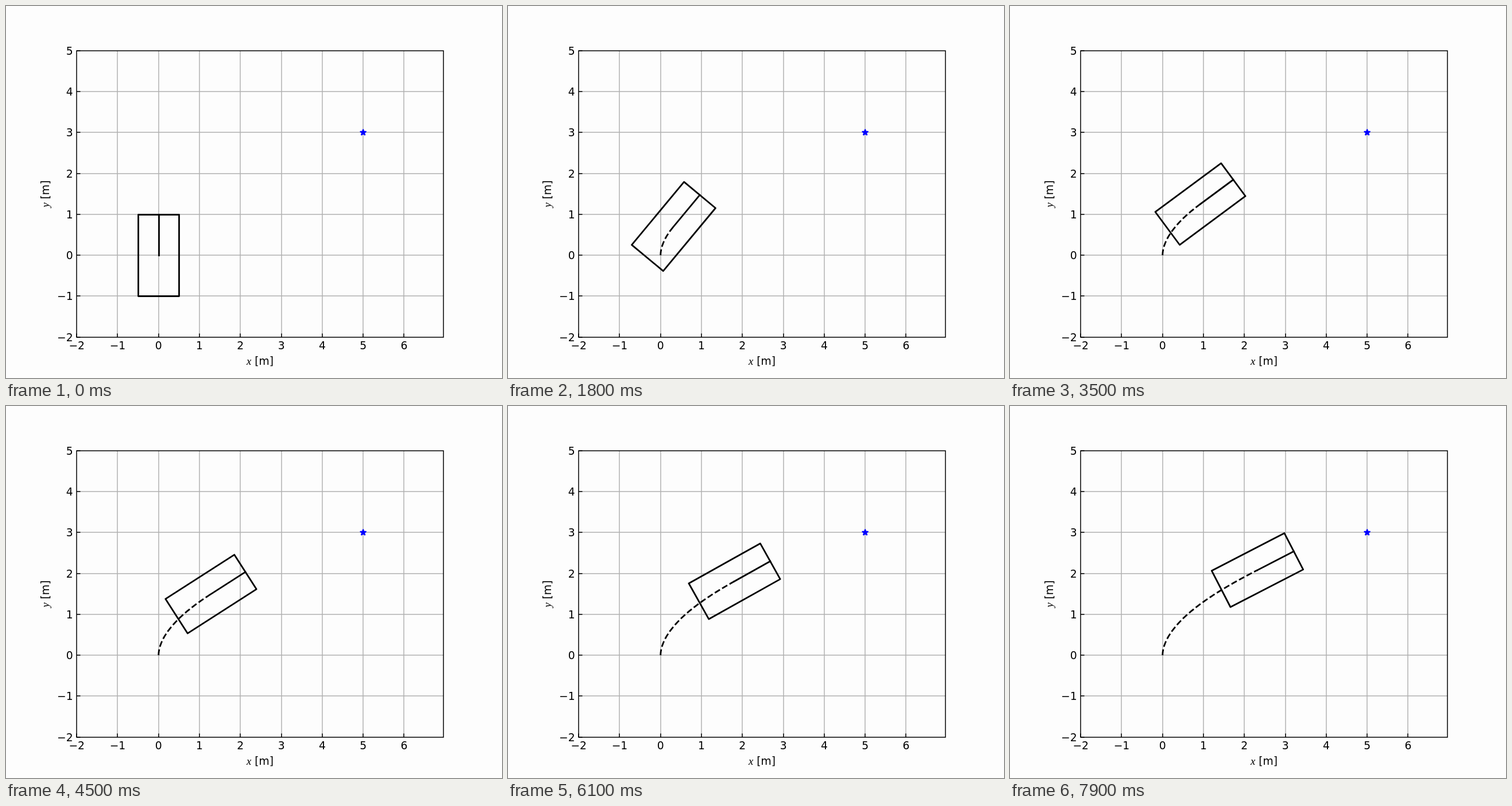
These frames come from a looping animation (864x648 px, 8 s). An HTML page:

```html
<!DOCTYPE html>
<html lang="en">
<head>
<meta charset="utf-8">
<title>Vehicle driving to a goal</title>
<style>
  html, body { margin: 0; width: 100%; height: 100%; overflow: hidden; background: #fdfdfd; }
  svg { display: block; width: 864px; height: 648px; }
  text { font: 18.75px "DejaVu Sans", sans-serif; fill: #000; }
  .var { font: italic 18.75px "Liberation Serif", serif; }
  .grid { stroke: #b0b0b0; stroke-width: 1.5; }
  .axis { stroke: #000; stroke-width: 1.5; fill: none; }
  .ink { stroke: #000; stroke-width: 2.81; fill: none; stroke-linejoin: round; }
  .solid { stroke-linecap: square; }
  .dashed { stroke-dasharray: 10.41 4.5; }
</style>
</head>
<body>
<svg id="stage" viewBox="0 0 864 648"></svg>
<script>
const SCALE = 71.28, GOAL = { x: 5, y: 3 }, STEP = 100, STEPS = 80;
const LEFT = 123, RIGHT = 762, TOP = 78, BOTTOM = 577;
const px = x => 265.76 + SCALE * x;
const py = y => 434.16 - SCALE * y;
const rad = degrees => degrees * Math.PI / 180;
const stage = document.getElementById('stage');

function add(tag, attributes, content = '') {
  const node = document.createElementNS('http://www.w3.org/2000/svg', tag);
  for (const key in attributes) node.setAttribute(key, attributes[key]);
  node.innerHTML = content;
  return stage.appendChild(node);
}
const line = (cls, x1, y1, x2, y2) => add('line', { class: cls, x1, y1, x2, y2 });
const label = (x, y, anchor, content, extra = {}) =>
  add('text', { x, y, 'text-anchor': anchor, ...extra }, content);
const number = n => n < 0 ? '\u2212' + -n : String(n);

// Seconds, position, heading and turn rate in degrees
const poses = [
  [0, 0, 0, 90, -36],
  [1, 0.102, 0.381, 63.4, -20.2],
  [2.7, 0.631, 1.018, 41.3, -7.4],
  [3.5, 0.924, 1.251, 36.5, -4.8],
  [4.5, 1.28, 1.495, 32.7, -3],
  [6.1, 1.807, 1.808, 29.2, -1.5],
  [7.9, 2.318, 2.08, 27.3, -0.7]
].map(([t, x, y, deg, turn]) => {
  const heading = rad(deg);
  const dx = GOAL.x - x, dy = GOAL.y - y;
  // Speed falls with the distance to the goal and the heading error
  const speed = 0.104 * Math.hypot(dx, dy) * Math.cos(heading - Math.atan2(dy, dx));
  return {
    t, value: [x, y, heading],
    rate: [speed * Math.cos(heading), speed * Math.sin(heading), rad(turn)]
  };
});

function poseAt(t) {
  let k = 0;
  while (k < poses.length - 2 && t > poses[k + 1].t) k++;
  const a = poses[k], b = poses[k + 1], span = b.t - a.t, u = (t - a.t) / span;
  const rise = u * u * (3 - 2 * u);
  const out = u * (1 - u) ** 2 * span, into = u * u * (u - 1) * span;
  const [x, y, heading] = a.value.map((v, i) =>
    v + (b.value[i] - v) * rise + a.rate[i] * out + b.rate[i] * into);
  return { x, y, heading };
}
const track = Array.from({ length: STEPS }, (_, i) => poseAt(i * STEP / 1000));

// Grid
for (let x = -1; x <= 6; x++) line('grid', Math.round(px(x)), TOP, Math.round(px(x)), BOTTOM);
for (let y = -1; y <= 4; y++) line('grid', LEFT, Math.round(py(y)), RIGHT, Math.round(py(y)));

const trail = add('polyline', { class: 'ink dashed' });
const body = add('polygon', { class: 'ink' });
const nose = add('polyline', { class: 'ink solid' });

// Goal marker
const star = Array.from({ length: 10 }, (_, i) => {
  const r = i % 2 ? 2.15 : 5.63, a = i * Math.PI / 5;
  return [px(GOAL.x) + r * Math.sin(a), py(GOAL.y) - r * Math.cos(a)];
});
add('polygon', {
  points: star.join(' '), fill: '#00f', stroke: '#00f',
  'stroke-width': 1.875, 'stroke-linejoin': 'bevel'
});

// Axes
add('rect', { class: 'axis', x: LEFT, y: TOP, width: RIGHT - LEFT, height: BOTTOM - TOP });
for (let x = -2; x <= 6; x++) {
  const at = Math.round(px(x));
  line('axis', at, BOTTOM, at, BOTTOM - 6.56);
  label(px(x), 597.6, 'middle', number(x));
}
for (let y = -2; y <= 5; y++) {
  const at = Math.round(py(y));
  line('axis', LEFT, at, LEFT + 6.56, at);
  label(116.6, at + 7, 'end', number(y));
}
const axisName = name => `<tspan class="var">${name}</tspan> [m]`;
label(442.6, 625, 'middle', axisName('x'));
label(0, 0, 'middle', axisName('y'), { transform: 'translate(75.3 327.2) rotate(-90)' });

function render(ms) {
  const step = Math.floor(ms / STEP) % STEPS;
  const { x, y, heading } = track[step];
  const c = Math.cos(heading), s = Math.sin(heading);
  // Upright lines sit on whole pixels
  const snap = v => step ? v : Math.round(v) + 0.5;
  const place = (ahead, side) =>
    [snap(px(x + ahead * c - side * s)), snap(py(y + ahead * s + side * c))];
  const corners = [[1, 0.5], [1, -0.5], [-1, -0.5], [-1, 0.5]];
  body.setAttribute('points', corners.map(p => place(...p)).join(' '));
  nose.setAttribute('points', [place(0, 0), place(1, 0)].join(' '));
  trail.setAttribute('points', track.slice(0, step + 1).map(p => [px(p.x), py(p.y)]).join(' '));
}

const start = performance.now();
function tick() {
  render(performance.now() - start);
  requestAnimationFrame(tick);
}
tick();
</script>
</body>
</html>
```
